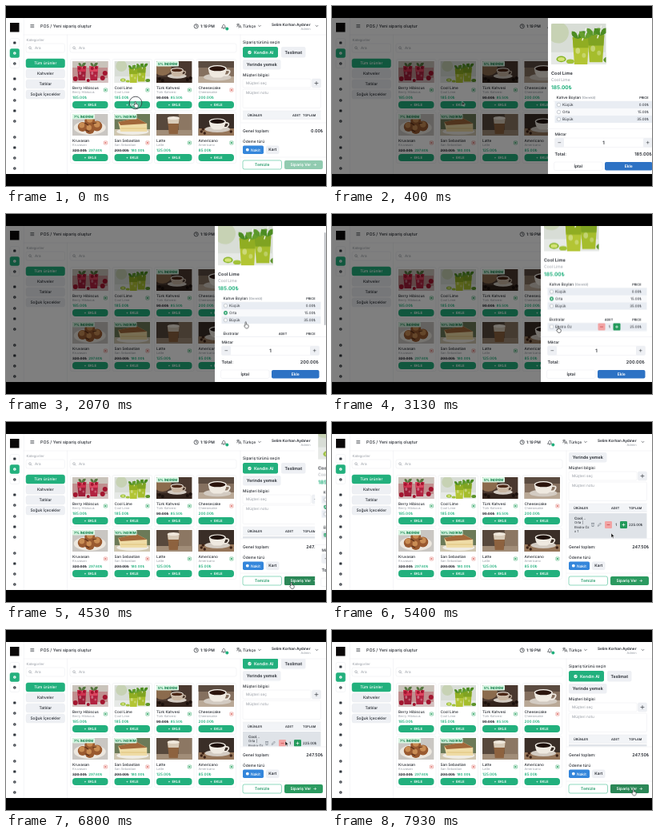
These frames come from a looping animation (400x225 px, 8000 ms). An HTML page:

```html
<!DOCTYPE html>
<html lang="tr">
<head>
<meta charset="utf-8">
<title>POS</title>
<style>
  html, body { margin: 0; width: 100%; height: 100%; overflow: hidden; background: #000; }
  #stage { display: block; width: 100%; height: 100%; }
  text { font-family: Inter, Roboto, sans-serif; text-rendering: geometricPrecision; white-space: pre; }
</style>
</head>
<body>
<svg id="stage" viewBox="0 0 400 225"></svg>
<script>
const LOOP = 8000;
const GREEN = '#22b07d', INK = '#262a31', GREY = '#969ba3', LINE = '#e8eaee', SOFT = '#eef0f4', BLUE = '#2d72c4';
const stage = document.getElementById('stage');

// Drawing helpers; text is placed by its vertical centre.
const box = (x, y, w, h, fill, r = 0, stroke = 'none') =>
  `<rect x="${x}" y="${y}" width="${w}" height="${h}" rx="${r}" fill="${fill}" stroke="${stroke}" stroke-width=".5"/>`;
const oval = (x, y, rx, ry, fill) => `<ellipse cx="${x}" cy="${y}" rx="${rx}" ry="${ry}" fill="${fill}"/>`;
const shape = (d, fill) => `<path d="${d}" fill="${fill}"/>`;
const line = (d, color = INK, width = .7) =>
  `<path d="${d}" fill="none" stroke="${color}" stroke-width="${width}" stroke-linecap="round" stroke-linejoin="round"/>`;
const text = (x, y, s, size = 5, fill = INK, weight = 400, anchor = 'start') =>
  `<text x="${x}" y="${y + size * .36}" font-size="${size}" fill="${fill}" font-weight="${weight}" text-anchor="${anchor}">${s}</text>`;
const mid = (x, y, s, size, fill, weight) => text(x, y, s, size, fill, weight, 'middle');
const end = (x, y, s, size, fill, weight) => text(x, y, s, size, fill, weight, 'end');
const button = (x, y, w, h, label, fill, color = INK, size = 5, stroke = 'none', weight = 600, r = 2) =>
  box(x, y, w, h, fill, r, stroke) + mid(x + w / 2, y + h / 2, label, size, color, weight);
const view = (x, y, w, h, body, area = `${x} ${y} ${w} ${h}`) =>
  `<svg x="${x}" y="${y}" width="${w}" height="${h}" viewBox="${area}" preserveAspectRatio="xMidYMid slice">${body}</svg>`;
const group = (id, body) => `<g id="${id}">${body}</g>`;
// Visible between each pair of times.
const during = (times, body) => `<g data-on="${times}">${body}</g>`;
const stepper = (x, y) =>
  box(x, y, 9, 9, '#f2a3a3', 1.2) + line(`M${x + 3} ${y + 4.5}h3`, '#c33f45') +
  mid(x + 14.2, y + 4.5, '1', 4.6, INK, 500) +
  box(x + 19, y, 9, 9, '#239a5b', 1.2) + line(`M${x + 22} ${y + 4.5}h3m-1.5 -1.5v3`, '#fff');
const search = (x, y) =>
  `<circle cx="${x}" cy="${y}" r="1.4" fill="none" stroke="${GREY}" stroke-width=".6"/>` + line(`M${x + 1} ${y + 1}l1 1`, GREY, .6);
const chevron = (x, y) => line(`M${x - 1.4} ${y - .7}l1.4 1.4 1.4 -1.4`, INK, .6);

// Food pictures on a 45 x 27 field.
const cup = (x, y, s, inside = '#2b140c', body = '#efe9e0') => `<g transform="translate(${x} ${y}) scale(${s})">` +
  oval(0, 9.5, 15, 3.8, '#d3cbc2') + line('M8 2q7 -1 5 3t-7 2', body, 1.5) +
  shape('M-10 0Q-9 9 -4 10H4Q9 9 10 0Z', body) + oval(0, 0, 10, 3.4, '#fbf7f0') + oval(0, .3, 8.8, 2.6, inside) + '</g>';
const glass = (x, y, top, low) =>
  shape(`M${x - 5.5} ${y}h11l-1.2 18h-8.6z`, low) + shape(`M${x - 5.5} ${y}h11l-.5 7h-10z`, top) +
  line(`M${x + 1} ${y + 2}l2.5 -8`, '#f3f6ee', .7) + oval(x - 2, y + 9, 1.5, 2, '#ffffff55') + oval(x + 2, y + 12, 1.3, 1.6, '#ffffff44');
const leaf = (x, y, c = '#4c8c22') => shape(`M${x} ${y}q-5 -1 -4 -5q4 0 4 5q0 -6 5 -5q0 4 -5 5`, c);
const dots = (list, c) => list.map(([x, y, r = 2]) => oval(x, y, r, r, c)).join('');
const scenes = {
  hibiscus: box(0, 0, 45, 27, '#c08f8f') + box(0, 0, 45, 8, '#c9c3ba') + box(0, 21, 45, 6, '#d3c0bf') +
    glass(12, 6, '#cf3350', '#a01d38') + glass(27, 6, '#dc4660', '#b22240') + leaf(12, 7, '#56773f') + leaf(27, 7, '#56773f') +
    dots([[9, 9], [15, 8], [25, 9], [30, 8], [38, 21, 3], [41, 15, 3], [4, 22, 3], [20, 24]], '#a3152f'),
  lime: box(0, 0, 45, 27, '#d8ddd6') + box(0, 19, 45, 8, '#e6e9e6') + oval(9, 6, 7, 7, '#c7d2b4') +
    glass(24, 9, '#90ad22', '#b3c534') + glass(34, 7.5, '#7fa322', '#a5bd2c') + leaf(22, 10) + leaf(27, 10, '#669f2e') +
    leaf(32, 8, '#5b982c') + leaf(37, 8) + oval(11, 23.5, 3.2, 2, '#86b425') + oval(11, 23.5, 2.3, 1.3, '#d5e378') +
    oval(17, 25, 2.6, 1.5, '#a1c237') + oval(42, 24, 3, 2, '#5d942b'),
  turkish: box(0, 0, 45, 27, '#4a382f') + oval(8, 9, 11, 9, '#8b6b4d') + box(0, 20, 45, 7, '#33241d') +
    cup(26, 11, .8, '#4c2817', '#c9b6a2') + dots([[4, 22], [8, 24], [39, 23], [43, 21]], '#1b100c'),
  coffee: box(0, 0, 45, 27, '#85705f') + box(0, 0, 45, 8, '#5b4b40') + box(0, 19, 45, 8, '#b9a896') + cup(24, 9, 1.15),
  croissant: box(0, 0, 45, 27, '#c9c6c2') + oval(22, 17, 20, 9, '#ece7df') +
    dots([[13, 16, 6], [22, 9, 6.5], [31, 15, 6.5], [22, 19, 6]], '#9a5a30') + dots([[12, 14, 3.4], [22, 7, 3.8], [31, 13, 3.8], [21, 17, 3.2]], '#c98d54') +
    line('M16 11l4 3M26 12l4 -1M17 20l4 2', '#5b2f18', 1.1),
  cake: box(0, 0, 45, 27, '#6c7a58') + box(0, 19, 45, 8, '#cfc6b0') + oval(23, 22, 20, 4, '#efece4') + shape('M5 10L28 5 41 12 41 22 8 22Z', '#efdca6') +
    shape('M5 10L28 5 41 12 8 14Z', '#a2683a') + line('M9 18H40', '#dfc27c', 1),
  latte: box(0, 0, 45, 27, '#57483c') + box(28, 0, 17, 27, '#8c7763') + box(0, 20, 45, 7, '#a18d78') +
    shape('M14 5H29L27 25H16Z', '#8d623f') + shape('M14 5H29L28 12H15Z', '#d8cbb9') + oval(21.5, 5, 7.5, 2, '#f0e8dc'),
  americano: box(0, 0, 45, 27, '#3a2e27') + box(0, 18, 45, 9, '#96765a') + cup(24, 9, 1.05, '#1e100a') +
    dots([[4, 22, 1.7], [8, 24, 1.7], [41, 22, 1.7], [6, 19, 1.7]], '#3b2115')
};
const photo = (name, x, y, w, h) => view(x, y, w, h, scenes[name], '0 0 45 27');

const products = [
  ['Berry Hibiscus', 'hibiscus', '185.00'], ['Cool Lime', 'lime', '185.00'],
  ['Türk Kahvesi', 'turkish', '85.50', '90.00', '5%'], ['Cheesecake', 'coffee', '200.00', '', '', true],
  ['Kruvasan', 'croissant', '297.60', '320.00', '7%', true], ['San Sebastian', 'cake', '180.00', '200.00', '10%', true],
  ['Latte', 'latte', '125.00'], ['Americano', 'americano', '85.00']
];
function card([name, scene, price, old, off, red], i) {
  const x = 83 + i % 4 * 52.5, y = 69 + (i > 3) * 66, mark = red ? '#dc6a62' : '#25a05c';
  const was = old ? `<tspan fill="${INK}" text-decoration="line-through">${old}₺</tspan><tspan dx="2.2">` : '<tspan>';
  return box(x - 2.5, y - 2.5, 49.5, 64, '#fff', 2, LINE) + photo(scene, x, y, 44.5, 27) +
    (off ? box(x, y, 28, 6.5, '#d9f5e3', 1) + mid(x + 14, y + 3.3, off + ' İNDİRİM', 4.2, '#12804a', 700) : '') +
    text(x, y + 33.2, name, 4.7, INK, 500) + text(x, y + 38.8, name, 4, GREY) +
    text(x, y + 45.4, `${was}${price}₺</tspan>`, old ? 4.4 : 4.7, GREEN, 600) +
    box(x + 39.4, y + 34, 4, 4, '#fff', .4, mark) + oval(x + 41.4, y + 36, 1, 1, mark) +
    button(x, y + 50, 44.5, 9, '+  EKLE', GREEN, '#fff', 4.3, 'none', 600, 4);
}

function sidebar() {
  const rows = [46, 59, 72, 91, 104, 118, 131, 144, 164, 177, 190, 203];
  return box(5, 21, 11.5, 11.5, '#0b0909') + line('M22.3 15V210', LINE, .5) + rows.map((y, i) => {
    const active = i === 1;
    return (i < 3 ? box(5, y - 5.5, 11.6, 11, active ? GREEN : '#fff', 2, active ? GREEN : LINE) : '') +
      (i % 3 ? oval(10.8, y, 1.8, 1.8, active ? '#fff' : '#33383f') + oval(10.8, y, .6, .6, active ? GREEN : '#fff')
             : box(9.2, y - 1.6, 3.2, 3.2, '#33383f', .7));
  }).join('');
}

const header = () =>
  line('M22 36H400', LINE, .5) + line('M30.8 23.5h4m-4 1.6h4m-4 1.6h4', INK, .6) + text(43, 25, 'POS / Yeni sipariş oluştur', 5.3, INK, 500) +
  `<circle cx="237.7" cy="25.3" r="2.6" fill="none" stroke="${INK}" stroke-width=".7"/>` + line('M237.7 23.7v1.7h1.2', INK, .6) +
  text(243, 25, '1:19 PM', 4.9, INK, 600) +
  line('M269.8 27.2h4.8q-1 -1 -1 -2.8a1.5 1.5 0 0 0 -2.8 0q0 1.8 -1 2.8m1.9 1h1', INK, .6) + oval(276.3, 28.5, 2, 2, GREEN) +
  line('M288.5 23h3m-1.5 -1v1m1 0q-.8 2.4 -2.6 3m.8 -2.4q.8 1.6 1.6 2m.2 1.6l1.5 -3.4 1.5 3.4m-2.4 -1h1.8', INK, .5) +
  text(296, 25, 'Türkçe', 4.9, INK, 500) + chevron(317, 25) +
  end(380.5, 23.2, 'Selim Korhan Aydıner', 4.7, INK, 600) + end(380.5, 28.4, 'Admin', 4, GREY) + chevron(388.5, 25);

const catalogue = () =>
  text(25.5, 42.6, 'Kategoriler', 4.3, GREY) + box(25, 47, 48.5, 11, '#fff', 2, LINE) + search(30, 52.2) + text(36, 52.5, 'Ara', 4.6, GREY) +
  ['Tüm ürünler', 'Kahveler', 'Tatlılar', 'Soğuk İçecekler'].map((s, i) =>
    button(25, 66 + 13 * i, 48.5, 11, s, i ? SOFT : GREEN, i ? INK : '#fff', 4.9, i ? LINE : GREEN, 500, 2.6)).join('') +
  line('M76.5 36V210', LINE, .5) + box(80, 47, 208, 11, '#fff', 2, LINE) + search(85, 52.2) + text(91, 52.5, 'Ara', 4.6, GREY) +
  products.map(card).join('');

const cartBody = () =>
  text(296, 45.2, 'Sipariş türünü seçin', 4.9, INK, 500) +
  box(296, 51, 44, 13.5, GREEN, 2.2) + oval(304.5, 58, 2.2, 2.2, '#fff') + line('M303.5 58l.8 .8 1.4 -1.6', GREEN, .6) + text(310, 58, 'Kendin Al', 5.3, '#fff', 600) +
  button(344, 51, 30.5, 13.5, 'Teslimat', SOFT, INK, 5.3) + button(296, 67, 47.5, 12.5, 'Yerinde yemek', SOFT, INK, 5.3) +
  text(296, 86, 'Müşteri bilgisi', 4.9, INK, 500) +
  box(296, 91, 85, 11, '#fff', 1.5, LINE) + text(300, 96.5, 'Müşteri seç', 4.7, GREY) +
  box(382.5, 91, 11, 11, SOFT, 1.5, LINE) + line('M386 96.5h4m-2 -2v4', INK, .6) +
  box(296, 104, 97.5, 23.5, '#fff', 1.5, LINE) + text(300, 108.8, 'Müşteri notu', 4.7, GREY) +
  box(296, 131, 97.5, 10.5, '#f2f4f7') + line('M296 131H393.5M296 141.5H393.5', LINE, .5) +
  text(302, 136.2, 'ÜRÜNLER', 3.8, INK, 600) + during('0,4340', text(358, 136.2, 'ADET', 3.8, INK, 600)) +
  during('4340,8000', text(349, 136.2, 'ADET', 3.8, INK, 600)) + text(371, 136.2, 'TOPLAM', 3.8, INK, 600) +
  during('4340,8000', box(296, 143, 97.5, 33, '#dfe3e8') + text(303, 149.4, 'Cool...', 4.5, INK, 600) +
    ['Orta |', 'Ekstra Öz', 'x 1'].map((s, i) => text(303, 155 + i * 5.3, s, 4.1)).join('') +
    line('M324.5 155.5h3m-2.6 0v4h2.2v-4M332.5 159l.4 -1.4 2.5 -2.5 1 1 -2.5 2.5z', '#59616b', .5) +
    stepper(341, 153) + text(371, 157.5, '225.00₺', 4.4, INK, 500));

const submit = (fill) => button(348, 193, 48, 11, 'Sipariş Ver  →', fill, '#fff', 4.9);
const cartFoot = () =>
  box(293.5, 145.5, 107, 65, '#fff') + line('M293.5 146H400', LINE, .5) + text(296, 156.4, 'Genel toplam:', 5.1, INK, 500) +
  during('0,4340', end(396.5, 156.4, '0.00₺', 5.4, INK, 600)) + during('4340,8000', end(396.5, 156.4, '247.50₺', 5.4, INK, 600)) +
  text(296, 169.5, 'Ödeme türü', 4.8, INK, 500) + box(296, 174.5, 26, 10.5, '#3486db', 1.8) + oval(301.8, 179.7, 1.9, 1.9, '#fff') +
  text(306, 179.8, 'Nakit', 4.8, '#fff', 500) + button(325, 174.5, 16.5, 10.5, 'Kart', SOFT, INK, 4.8) +
  line('M293.5 189H400', LINE, .5) + button(296, 193, 48.5, 11, 'Temizle', '#fff', '#239a68', 4.9, GREEN) +
  during('0,4340', submit('#91cbb0')) + during('4340,8000', submit('#2b9a60')) + during('4340,4700,7760,8000', submit('#2b8757'));

const sizes = [['Küçük', '0.00₺'], ['Orta', '15.00₺'], ['Büyük', '35.00₺']];
const radio = (y) => `<circle cx="274.5" cy="${y}" r="2.2" fill="#fff" stroke="#a7adb6" stroke-width=".6"/>`;
const modalBody = () =>
  photo('lime', 265, 22, 68.5, 51) + text(265, 84.2, 'Cool Lime', 5.6, INK, 600) + text(265, 92.2, 'Cool Lime', 5, GREY) +
  text(265, 101.3, '185.00₺', 6.5, GREEN, 700) +
  text(271.5, 114.6, 'Kahve Boyları <tspan font-size="4.2" fill="#8d939c">(Gerekli)</tspan>', 4.7, INK, 500) + end(386.5, 114.6, 'PRICE', 3.9, INK, 600) +
  line('M268 119H393.5', LINE, .5) +
  sizes.map(([name, price], i) => {
    const y = 123.5 + i * 9;
    return box(269.5, y - 4.5, 124, 9, i % 2 ? '#f8f9fb' : '#e9edf3') + radio(y) + text(279, y, name, 4.6) + end(387, y, price, 4.5);
  }).join('') +
  during('1430,8000', oval(274.5, 132.5, 2.4, 2.4, '#21a366') + oval(274.5, 132.5, 1, 1, '#fff')) +
  text(271.5, 158.3, 'Ekstralar', 4.7, INK, 500) + mid(346, 158.3, 'ADET', 3.9, INK, 600) + end(386.5, 158.3, 'PRICE', 3.9, INK, 600) +
  box(269.5, 162.5, 124, 10, '#e9edf3') + box(272.3, 165.2, 4.4, 4.4, '#fff', .8, '#a7adb6') +
  during('3320,8000', box(272.3, 165.2, 4.4, 4.4, '#21a366', .8) + line('M273.4 167.4l.8 .8 1.5 -1.7', '#fff', .6)) +
  text(279, 167.5, 'Ekstra Öz', 4.6) + stepper(332.5, 163) + end(387, 167.5, '25.00₺', 4.5);

const modalTotal = (times, s) => during(times, end(391, 185.3, s, 5.6, INK, 600));
const modal = () =>
  box(261, 15, 140, 196, '#fff') + view(261, 15, 139, 138.5, group('modalScroll', modalBody())) +
  during('130,2600', group('thumb', box(397.8, 16, 1.8, 116, '#b9bcc1', .9))) +
  line('M261 153.5H400', LINE, .5) + text(269.5, 160.3, 'Miktar', 4.8, INK, 500) +
  box(269.5, 165, 122, 11.5, '#fff', 1.5, LINE) + box(269.5, 165, 11.5, 11.5, SOFT, 1.5) + box(380, 165, 11.5, 11.5, SOFT, 1.5) +
  line('M273.8 170.7h3M384.2 170.7h3m-1.5 -1.5v3', INK, .5) + mid(330.5, 170.8, '1', 6, INK, 600) +
  text(269.5, 185.3, 'Total:', 5.3, INK, 600) + modalTotal('0,1430', '185.00₺') + modalTotal('1430,3320', '200.00₺') + modalTotal('3320,8000', '225.00₺') +
  button(268.5, 195, 60.5, 10.5, 'İptal', '#fff', INK, 5, LINE) + button(332, 195, 59.5, 10.5, 'Ekle', BLUE, '#fff', 5);

const pointer = () =>
  during('0,150,1250,1420,3250,3410,4230,4370', `<circle r="7.8" fill="#ffffff33" stroke="#30343a" stroke-width=".8"/>`) +
  during('0,280,1120,4720,7700,8000', `<path d="M-1 3V-.7q0 -.9 .7 -.9t.7 .9V1.5q2.8 0 2.8 1.6V4.5Q3 6 2 6.3H-.3Q-1.5 5 -2.4 3.2q.4 -1 1.4 -.2Z" fill="#fff" stroke="#16181b" stroke-width=".6"/>`) +
  during('280,1120,4720,7700', `<path d="M-1 -2V3.4L.3 2.3 1.2 4.3 2.1 3.9 1.2 2H2.9Z" fill="#111" stroke="#fff" stroke-width=".4"/>`);

stage.innerHTML = box(0, 0, 400, 225, '#000') + view(0, 15, 400, 195,
  box(0, 15, 400, 196, '#fff') + sidebar() + header() + catalogue() + line('M293 36V210', LINE, .5) +
  view(293.5, 36.5, 106.5, 109, group('cartScroll', cartBody())) + cartFoot() +
  group('shade', box(0, 15, 400, 196, '#000')) + group('modal', modal()) + group('pointer', pointer()));

// Motion: rows of [ms, value, easing towards the next row].
function play(target, property, rows, easing = 'ease-in-out') {
  const frames = rows.map(([ms, value, ease = easing]) => ({ offset: ms / LOOP, [property]: value, easing: ease }));
  target.animate(frames, { duration: LOOP, iterations: Infinity });
}
const slide = (id, axis, rows) =>
  play(document.getElementById(id), 'transform', rows.map(([ms, v, e]) => [ms, `translate${axis}(${v}px)`, e]));

for (const el of stage.querySelectorAll('[data-on]')) {
  const times = el.dataset.on.split(',').map(Number);
  const rows = times.map((ms, i) => [ms, i % 2 ? 0 : 1]);
  if (times[0]) rows.unshift([0, 0]);
  if (times.at(-1) < LOOP) rows.push([LOOP, 0]);
  play(el, 'opacity', rows, 'step-end');
}

play(document.getElementById('shade'), 'opacity', [[0, 0], [130, 0], [350, .5], [4330, .5], [4510, 0], [LOOP, 0]], 'linear');
slide('modal', 'X', [[0, 140], [130, 140, 'ease-out'], [470, 0], [4330, 0, 'ease-in'], [4530, 125, 'ease-out'], [4680, 140], [LOOP, 140]]);
slide('modalScroll', 'Y', [[0, 0], [1850, 0], [2400, -26.5], [LOOP, -26.5]]);
slide('thumb', 'Y', [[0, 0], [1850, 0], [2400, 21], [LOOP, 21]]);
slide('cartScroll', 'Y', [[0, 0], [4980, 0], [5330, -29], [6600, -29, 'ease-in'], [6800, -16, 'ease-out'], [7100, 0], [LOOP, 0]]);
play(document.getElementById('pointer'), 'transform', [
  [0, 162, 121], [330, 162, 121], [1200, 285.5, 132], [1480, 285.5, 132], [1900, 300, 136], [2400, 300, 138],
  [2950, 283, 142], [3450, 283, 142], [4130, 357, 202], [4560, 357, 202], [4980, 350, 141],
  [7380, 350, 141], [7900, 377, 200.5], [LOOP, 377, 200.5]
].map(([ms, x, y]) => [ms, `translate(${x}px, ${y}px)`]));
</script>
</body>
</html>
```
